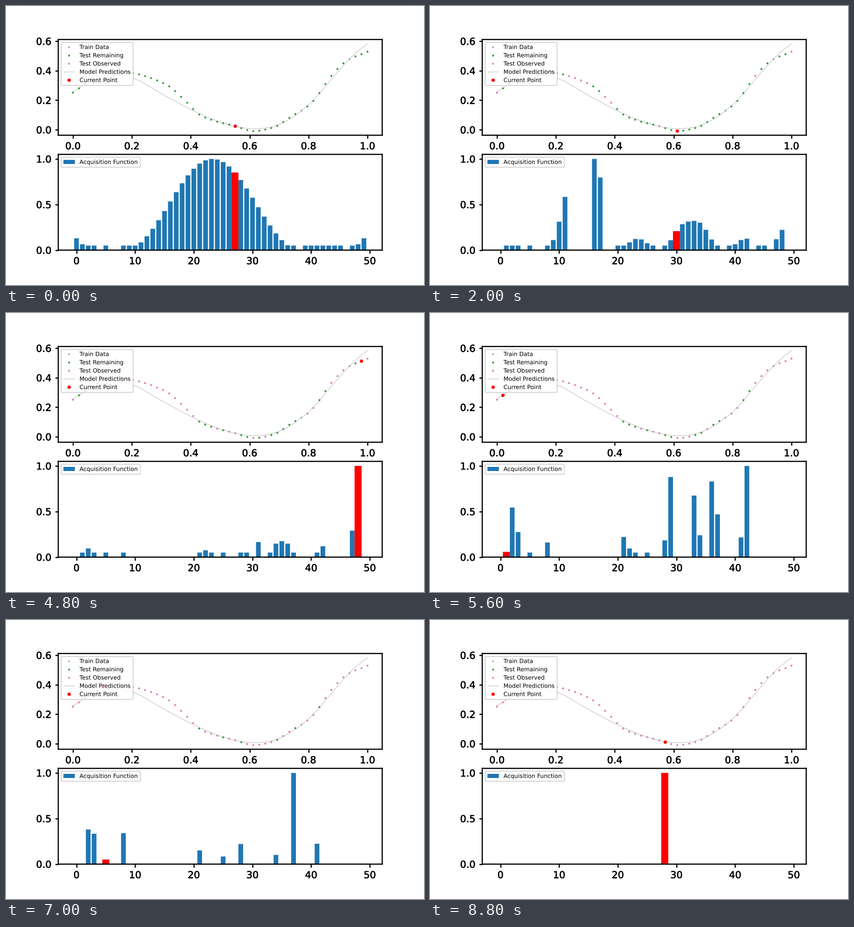
A matplotlib script for the animation above (9000 ms loop, 917 by 611 pixels).

```python
import numpy as np
import matplotlib.pyplot as plt
from matplotlib.animation import FuncAnimation
from matplotlib.patheffects import Normal, withStroke

DPI = 152.75
COUNT = 50
FLOOR = 0.05
GRAY, GREEN, PINK, BLUE = "#7f7f7f", "#2ca02c", "#e377c2", "#1f77b4"

# Order in which the test points are queried; the rest is training data.
PICKS = [27, 19, 49, 14, 43, 13, 18, 0, 12, 15,
         30, 32, 17, 11, 45, 24, 40, 26, 39,
         20, 16, 10, 44, 9,
         48, 31, 47, 35, 1, 22, 23,
         33, 42, 29, 36, 5, 21, 2, 34,
         37, 41, 8, 3, 25, 28]

index = np.arange(COUNT)
xs = index / (COUNT - 1)


def smooth(x, knots):
    """Cubic Hermite curve through a few (x, y) knots."""
    kx, ky = np.array(knots).T
    slope = np.gradient(ky, kx)
    k = np.clip(np.searchsorted(kx, x) - 1, 0, len(kx) - 2)
    h = kx[k + 1] - kx[k]
    t = (x - kx[k]) / h
    s = t * t * (3 - 2 * t)
    bend = t * (1 - t) * ((1 - t) * slope[k] - t * slope[k + 1])
    return ky[k] * (1 - s) + ky[k + 1] * s + h * bend


ys = smooth(index, [
    (0, .251), (3, .337), (6, .4), (10, .384), (14, .334), (16, .294),
    (19, .183), (21, .103), (23, .068), (27, .024), (30, -.009), (32, .001),
    (34, .027), (36, .081), (40, .195), (43, .365), (45, .45), (49, .529)])
model = smooth(xs, [
    (0, .258), (.08, .345), (.14, .372), (.2, .353), (.3, .245), (.4, .138),
    (.5, .052), (.6, .008), (.7, .036), (.8, .169), (.9, .394), (.95, .503),
    (1, .583)])


def peaks(width, heights):
    """Sum of Gaussian bumps of one width, given as {centre: height}."""
    return sum(h * np.exp(-((index - c) / width) ** 2)
               for c, h in heights.items())


def first_profile():
    """One wide hump plus a little uncertainty at both ends."""
    angle = np.clip(0.1045 * (index - 23.2), -np.pi / 2, np.pi / 2)
    edge = np.minimum(index, COUNT - 1 - index)
    return np.cos(angle) ** 2 + 0.13 * np.exp(-0.7 * edge)


PROFILES = {
    0: first_profile(),
    10: peaks(2.2, {12: .73, 16: 1, 23.4: .13, 31: .25, 34: .27,
                    41.8: .13, 49: .28}),
    19: peaks(1, {10: .41, 16: 1, 44: .16, 48: .26}),
    24: peaks(.9, {2: .095, 22: .075, 31: .165, 34.3: .16, 35.7: .16,
                   42: .12, 48: 1}),
    31: peaks(.8, {2.3: .6, 8: .175, 21: .225, 29: .957, 33: .72,
                   36.35: .96, 42: 1}),
    39: peaks(.8, {3: .22, 8: .333, 25: .125, 28: .13, 37: 1, 41: .125}),
    44: peaks(.8, {28: 1}),
}
STEPS = list(PROFILES)
COLUMNS = np.transpose(list(PROFILES.values()))


def acquisition(frame):
    """Bar heights of the unqueried points, scaled so the largest is 1."""
    values = np.array([np.interp(frame, STEPS, col) for col in COLUMNS])
    left = PICKS[frame:]
    heights = np.zeros(COUNT)
    heights[left] = np.maximum(values[left] / values[left].max(), FLOOR)
    return heights


# The small margin keeps the pixel size from rounding down.
fig, (top, low) = plt.subplots(
    2, 1, figsize=(917.001 / DPI, 611.001 / DPI), dpi=DPI, facecolor="white",
    gridspec_kw=dict(left=0.125, right=0.9, bottom=0.125, top=0.88,
                     hspace=0.2))


def dot_key(color, size, label):
    top.plot([], [], ".", color=color, ms=size, label=label)


dot_key(GRAY, 1, "Train Data")
dot_key(GREEN, 2, "Test Remaining")
dot_key(PINK, 2, "Test Observed")
top.plot(xs, model, color=GRAY, lw=0.25, label="Model Predictions")
dot_key("red", 5, "Current Point")
points = top.scatter(xs, ys, c=[GRAY] * COUNT, linewidths=0, zorder=2.5)

bars = low.bar(index, np.zeros(COUNT), color=BLUE, snap=False,
               label="Acquisition Function")
marker = low.bar([0], [0], width=1.2, color="red", snap=False)[0]

top.set(xlim=(-0.05, 1.05), ylim=(-0.0372, 0.6115),
        xticks=np.arange(6) / 5, yticks=np.arange(4) / 5)
low.set(xlim=(-3.11, 52.11), ylim=(0, 1.05),
        xticks=range(0, 51, 10), yticks=[0, 0.5, 1])

for ax in (top, low):
    legend = ax.legend(loc="upper left", fontsize=6, labelspacing=0.4,
                       borderpad=0.36)
    # Drawing text as paths keeps its shapes free of hinting.
    for text in legend.get_texts():
        text.set_path_effects([Normal()])
    ax.tick_params(width=1.2, labelsize=10, labelfontfamily="DejaVu Sans")
    for spine in ax.spines.values():
        spine.set(linewidth=1.2, snap=False)
    for label in ax.get_xticklabels() + ax.get_yticklabels():
        label.set_path_effects([withStroke(linewidth=0.3,
                                           foreground="black")])


def update(frame):
    pick = PICKS[frame]
    colors = np.full(COUNT, GRAY, dtype=object)
    colors[PICKS[frame:]] = GREEN
    colors[PICKS[:frame]] = PINK
    colors[pick] = "red"
    diameters = np.full(COUNT, 1.5)
    diameters[PICKS] = 2
    diameters[pick] = 3.5
    points.set_facecolor(list(colors))
    points.set_sizes(diameters ** 2)

    heights = acquisition(frame)
    for bar, height in zip(bars, heights):
        bar.set_height(height)
    marker.set_x(pick - 0.6)
    marker.set_height(heights[pick])
    return [points, marker, *bars]


anim = FuncAnimation(fig, update, frames=len(PICKS), interval=200,
                     repeat=True, repeat_delay=0, blit=False)
plt.show()
```
